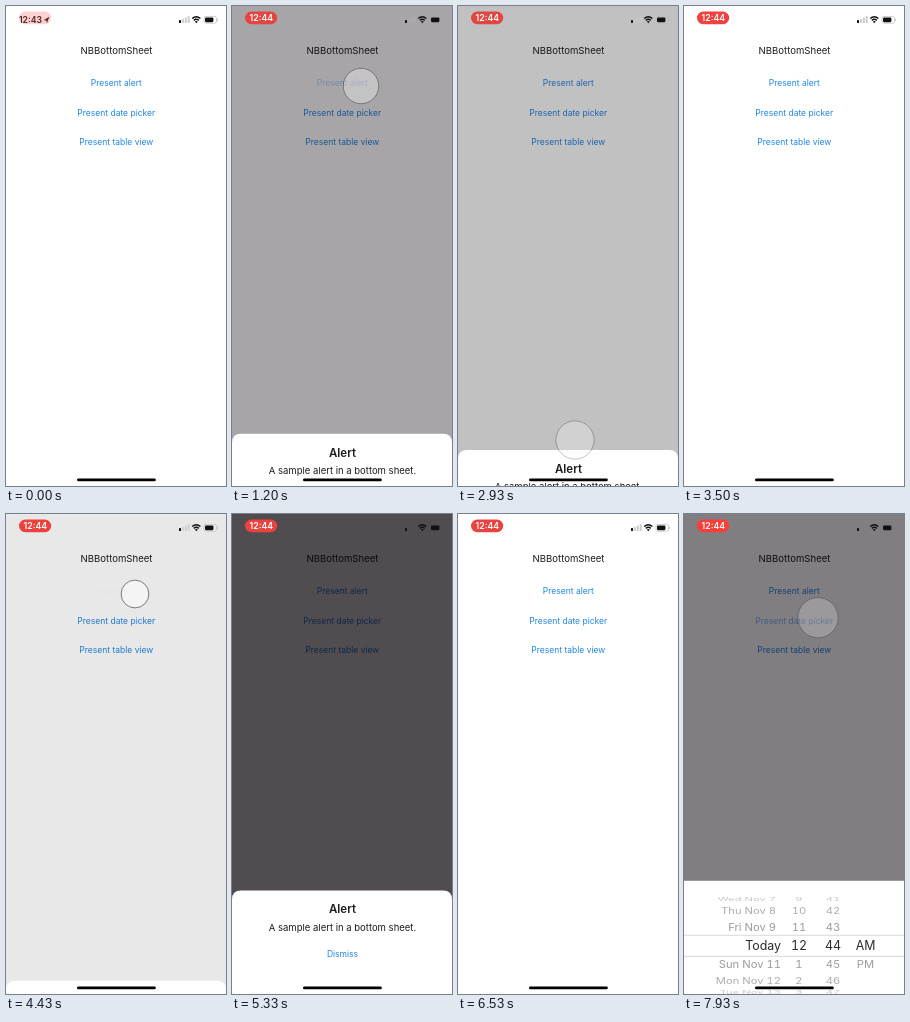
Animation, 220 px wide and 480 px high, one loop 8000 ms. Source, as an HTML page:

```html
<!DOCTYPE html>
<html lang="en">
<head>
<meta charset="utf-8">
<title>Bottom sheet demo</title>
<style>
  html, body { margin: 0; width: 100%; height: 100%; overflow: hidden; background: #fff; }
  svg { display: block; width: 100%; height: 100%; }
  text { font-family: Inter, Roboto, "Liberation Sans", sans-serif; text-anchor: middle; fill: #1c1c1e; }
  .link { font-size: 8.5px; fill: #2185e2; }
  .clock { font-size: 8.7px; font-weight: 600; }
  #wheels { font-variant-numeric: tabular-nums; }
</style>
</head>
<body>
<svg viewBox="0 0 220 480">
  <rect width="220" height="480" fill="#fff"/>
  <text x="110.5" y="47.8" font-size="9.6">NBBottomSheet</text>
  <text class="link" id="alertLink" x="110.3" y="80">Present alert</text>
  <text class="link" id="dateLink" x="110.3" y="109.5">Present date picker</text>
  <text class="link" x="110.3" y="139">Present table view</text>

  <rect id="dim" width="220" height="480" fill="rgb(6,0,6)"/>

  <rect x="173" y="14" width="2" height="3" rx=".5" fill="#111"/>
  <g id="faint" fill="#ccc">
    <rect x="175.9" y="13" width="2" height="4" rx=".5"/>
    <rect x="178.8" y="11.5" width="2" height="5.5" rx=".5"/>
    <rect x="181.7" y="10" width="2" height="7" rx=".5"/>
    <rect x="198" y="10.4" width="12.6" height="6.8" rx="2" fill="none" stroke="#aaa" stroke-width=".6"/>
    <rect x="211.3" y="12.7" width=".8" height="2.2" rx=".4" fill="#aaa"/>
  </g>
  <g fill="none" stroke="#111" stroke-width="1.4">
    <path d="M186.2 12.6Q190.3 8.8 194.4 12.6"/>
    <path d="M187.8 14.4Q190.3 12.2 192.8 14.4"/>
  </g>
  <path d="M188.8 15.6Q190.3 14.6 191.8 15.6L190.3 17.3Z" fill="#111"/>
  <rect x="199" y="11.4" width="8.4" height="4.8" rx="1.1" fill="#111"/>

  <g id="alert">
    <path d="M0 120V9Q0 0 9 0H211Q220 0 220 9V120Z" fill="#fff"/>
    <text x="110.5" y="22.8" font-size="11.5" font-weight="600">Alert</text>
    <text x="110.5" y="40.2" font-size="9.5">A sample alert in a bottom sheet.</text>
    <text class="link" x="110.5" y="66.6">Dismiss</text>
  </g>

  <g id="picker">
    <rect width="220" height="160" fill="#fff"/>
    <path d="M0 54.5H220M0 75.5H220" stroke="#d0d0d2" stroke-width=".8"/>
    <g id="wheels"></g>
  </g>

  <circle id="touch" fill="#fff" stroke="#000" stroke-width=".9"/>

  <g id="oldClock">
    <text class="clock" x="24.5" y="17">12:43</text>
    <path d="M37.5 14.2L43.4 10.8L40.9 17.2L40.3 14.6Z" fill="#222"/>
  </g>
  <rect id="pill" x="13" y="5.6" width="32.2" height="12.6" rx="6.3"/>
  <text class="clock" id="newClock" x="29.3" y="15.1" style="fill:#fff">12:44</text>
  <rect x="71" y="472.4" width="78.8" height="2.9" rx="1.4" fill="#000"/>
</svg>
<script>
const $ = id => document.getElementById(id);
const LOOP = 8000, LAST = 7930, MOVE = 300, LEAD = 190;

// Each tap: release time, position, link that lights up.
const taps = [
  { at: 1050, x: 129, y: 80, link: 'alertLink' },
  { at: 2750, x: 117, y: 434 },
  { at: 4364, x: 129, y: 80, link: 'alertLink' },
  { at: 6150, x: 120, y: 290 },
  { at: 7726, x: 134, y: 103.7, link: 'dateLink' }
];

const ramp = (t, a, b) => Math.min(1, Math.max(0, (t - a) / (b - a)));
const ease = (t, start) => {
  const u = ramp(t, start, start + MOVE);
  return u * u * (3 - 2 * u);
};
const mix = (a, b, k) => a + (b - a) * k;
const show = (id, k) => $(id).setAttribute('opacity', k.toFixed(3));

function buildWheels() {
  const dates = ['Wed Nov 7', 'Thu Nov 8', 'Fri Nov 9', 'Today', 'Sun Nov 11', 'Mon Nov 12', 'Tue Nov 13'];
  const grey = ['#2c2c2e', '#9c9c9e', '#acacae', '#c8c8ca'];
  let out = '';
  dates.forEach((date, i) => {
    const row = i - 3, angle = row * 21 * Math.PI / 180;
    const y = 65 + 52 * Math.sin(angle), scale = Math.cos(angle);
    const size = row ? 11.2 : 12.4;
    const cell = (x, label, anchor = 'middle') =>
      `<text x="${x}" y="${size * 0.36}" style="text-anchor:${anchor};fill:${grey[Math.abs(row)]}">${label}</text>`;
    out += `<g transform="translate(0 ${y}) scale(1 ${scale})" font-size="${size}">`
      + cell(row < 0 ? 92 : 97, date, 'end')
      + cell(115, (11 + row + 12) % 12 + 1)
      + cell(149, 44 + row)
      + (row === 0 ? cell(181.5, 'AM') : row === 1 ? cell(181.5, 'PM') : '')
      + '</g>';
  });
  $('wheels').innerHTML = out;
}

function drawTouch(t) {
  const links = { alertLink: 1, dateLink: 1 };
  let alpha = 0;
  for (const tap of taps) {
    const dt = t - tap.at;
    if (dt < -LEAD || dt > 340) continue;
    alpha = ramp(dt, -LEAD, -LEAD + 70) * (1 - ramp(dt, 60, 290)) * 0.55;
    $('touch').setAttribute('cx', tap.x);
    $('touch').setAttribute('cy', tap.y);
    $('touch').setAttribute('r', 10.8 + 0.046 * Math.max(0, dt));
    if (tap.link) {
      links[tap.link] = dt < 0
        ? mix(1, 0.03, ramp(dt, -LEAD, -LEAD + 60))
        : mix(0.03, 1, ramp(dt, 80, 300));
    }
  }
  show('touch', alpha);
  for (const id in links) show(id, links[id]);
}

function drawStatus(t) {
  const k = ramp(t, 100, 400);
  const glow = 0.5 + 0.5 * Math.cos((t - 1930) / 1000 * Math.PI);
  const red = [mix(224, 249, glow), mix(70, 62, glow), mix(66, 58, glow)].map(Math.round);
  $('pill').setAttribute('fill', `rgb(${red})`);
  show('pill', mix(0.24, 1, k));
  show('oldClock', 1 - k);
  show('newClock', k);
}

function render(t) {
  const [open1, close1, open2, close2, open3] = taps.map(tap => ease(t, tap.at));
  const alert = open1 - close1 + open2 - close2;
  const shade = Math.max(alert, open3 * 0.95);
  $('alert').setAttribute('transform', `translate(0 ${480 - 103.5 * alert})`);
  $('picker').setAttribute('transform', `translate(0 ${480 - 149.3 * open3})`);
  show('dim', 0.7 * shade);
  show('faint', 1 - ramp(shade, 0, 0.6));
  drawTouch(t);
  drawStatus(t);
}

buildWheels();
const start = performance.now();
function tick() {
  render(Math.min((performance.now() - start) % LOOP, LAST));
  requestAnimationFrame(tick);
}
tick();
</script>
</body>
</html>
```
